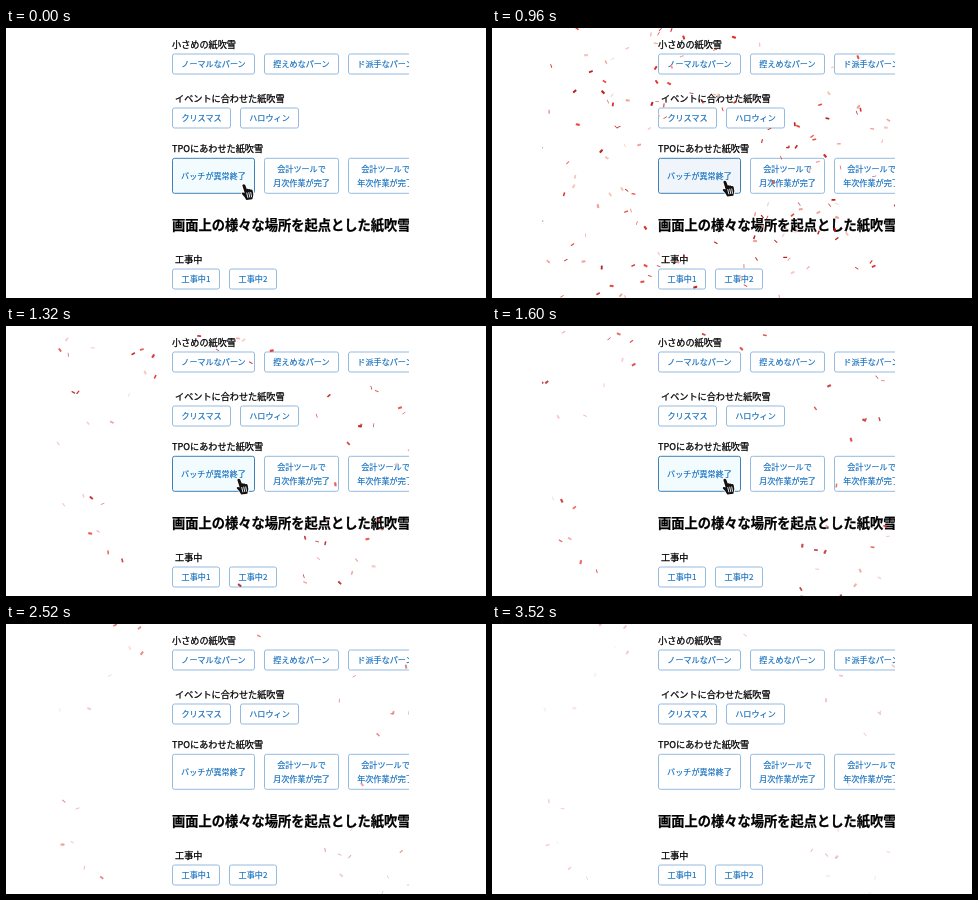
Recreate the animation shown at these times as an HTML page. Size 480 by 270 pixels, loop 4.04 s.

```html
<!DOCTYPE html>
<html lang="ja">
<head>
<meta charset="utf-8">
<style>
  html, body { margin: 0; width: 100%; height: 100%; overflow: hidden; background: #fff; }
  svg { display: block; width: 480px; height: 270px; font-family: 'Noto Sans CJK JP', 'Noto Sans CJK', sans-serif; }
  .label { font-size: 9.15px; font-weight: 500; fill: #000; stroke: #000; stroke-width: .25px; }
  .title { font-size: 13.25px; font-weight: 700; fill: #000; stroke: #000; stroke-width: .25px; }
  .button { font-size: 8.1px; fill: #0f6cbd; stroke: #0f6cbd; stroke-width: .15px; text-anchor: middle; }
  .box { fill: #fff; stroke: #94bbe0; }
</style>
</head>
<body>
<svg viewBox="0 0 480 270">
  <clipPath id="view"><rect x="50" width="353" height="270"/></clipPath>
  <g clip-path="url(#view)">
    <g id="page"></g>
    <ellipse id="press" cx="235" cy="153" rx="12" ry="8" fill="#d5e5f5"/>
    <g id="confetti"></g>
    <g id="cursor">
      <path d="M.8 1.2Q2.2-.7 3.7 1L5.2 5Q6.3 4.2 7.2 5.2Q8.3 4.6 9.2 5.7Q10.7 5.3 11.2 6.8L11.8 10.5Q11.6 12.8 10.8 15.2L4.8 16Q3 12.6 .2 9.8Q.4 8 2.6 8.8L3.2 9Z"
        fill="#111" stroke="#fff" stroke-width="1.6" paint-order="stroke" stroke-linejoin="round"/>
      <path d="M5.2 8.6l1.2 5.2M7.2 8.2l1.1 5.3M9.2 8l.9 5.2" stroke="#fff" stroke-width=".9"/>
    </g>
  </g>
</svg>
<script>
const LOOP = 4040, LAST = 3520, STEP = 40;
const BURST = 721, DRAG = 0.0028, LIFE = 3750;
const PIECES = 200, ORIGIN = { x: 209, y: 148 };
const LEFT = 166, GAP = 9, LINE = 14;
const $ = id => document.getElementById(id);

function add(parent, tag, attrs, text = '') {
  const el = document.createElementNS('http://www.w3.org/2000/svg', tag);
  for (const key in attrs) el.setAttribute(key, attrs[key]);
  el.textContent = text;
  parent.append(el);
  return el;
}

const write = (kind, x, y, text) => add($('page'), 'text', { class: kind, x, y }, text);

// Digits are narrower than kana and kanji.
const buttonWidth = lines => Math.round(17.6 + 8.2 * Math.max(
  ...lines.map(line => [...line].reduce((sum, c) => sum + (/\d/.test(c) ? .7 : 1), 0))));

// A label with a row of buttons below it; returns the first button's box.
function section(y, indent, label, height, ...buttons) {
  write('label', LEFT + indent, y - 6, label);
  let x = LEFT;
  const boxes = buttons.map(text => {
    const lines = text.split('\n'), width = buttonWidth(lines);
    const box = add($('page'), 'rect', { class: 'box', x: x + .5, y: y + .5, width: width - 1, height: height - 1, rx: 2 });
    lines.forEach((line, i) => write('button', x + width / 2,
      y + height / 2 + 2.7 + (i - (lines.length - 1) / 2) * LINE, line));
    x += width + GAP;
    return box;
  });
  return boxes[0];
}

section(25.5, 0, '小さめの紙吹雪', 21, 'ノーマルなパーン', '控えめなパーン', 'ド派手なパーン');
section(79.5, 3, 'イベントに合わせた紙吹雪', 21, 'クリスマス', 'ハロウィン');
const target = section(129.8, 0, 'TPOにあわせた紙吹雪', 36,
  'バッチが異常終了', '会計ツールで\n月次作業が完了', '会計ツールで\n年次作業が完了');
write('title', LEFT, 202.3, '画面上の様々な場所を起点とした紙吹雪');
section(240.5, 3, '工事中', 21, '工事中1', '工事中2');

let seed = 29;
const random = () => (seed = seed * 16807 % 2147483647) / 2147483647;
const between = (a, b) => a + (b - a) * random();

const colors = ['#d92020', '#b81414', '#e84038', '#f09a94', '#f7c0bc'];
const pieces = Array.from({ length: PIECES }, () => ({
  heading: between(0, 2 * Math.PI),
  reach: between(135, 405),
  angle: between(0, 180),
  wobble: between(0, 2 * Math.PI),
  pace: between(.003, .006),
  el: add($('confetti'), 'rect', {
    x: -2, y: -1.1, width: 4, height: 2.2, rx: .5,
    fill: colors[Math.floor(random() * colors.length)]
  })
}));

function drawConfetti(age) {
  $('confetti').setAttribute('opacity', age < 0 ? 0 : Math.max(0, 1 - age / LIFE));
  const spread = 1 - Math.exp(-DRAG * Math.max(0, age));
  for (const p of pieces) {
    const phase = p.wobble + p.pace * age, distance = p.reach * spread;
    const x = ORIGIN.x + distance * Math.cos(p.heading);
    const y = ORIGIN.y + distance * Math.sin(p.heading);
    p.el.setAttribute('transform',
      `translate(${x} ${y}) rotate(${p.angle + 25 * Math.sin(phase)}) scale(1 ${.65 + .35 * Math.cos(phase)})`);
  }
}

function drawPointer(t) {
  const move = Math.min(1, Math.max(0, (t - 520) / 120));
  const pressed = t >= 680 && t < 920, hovered = t < 2520;
  $('cursor').setAttribute('transform', `translate(${235.5 - 5 * move} ${156 - 3.5 * move})`);
  $('cursor').setAttribute('opacity', hovered && !pressed ? 1 : 0);
  $('press').setAttribute('opacity', pressed ? .8 : 0);
  target.style.fill = !hovered || pressed ? '#fff' : t >= 920 && t < 1300 ? '#eff5fb' : '#f2fcff';
  target.style.stroke = hovered ? '#3f80b5' : '';
}

function frame(now) {
  const t = Math.min(LAST, Math.floor(now % LOOP / STEP) * STEP);
  drawPointer(t);
  drawConfetti(t - BURST);
  requestAnimationFrame(frame);
}
frame(0);
</script>
</body>
</html>
```
